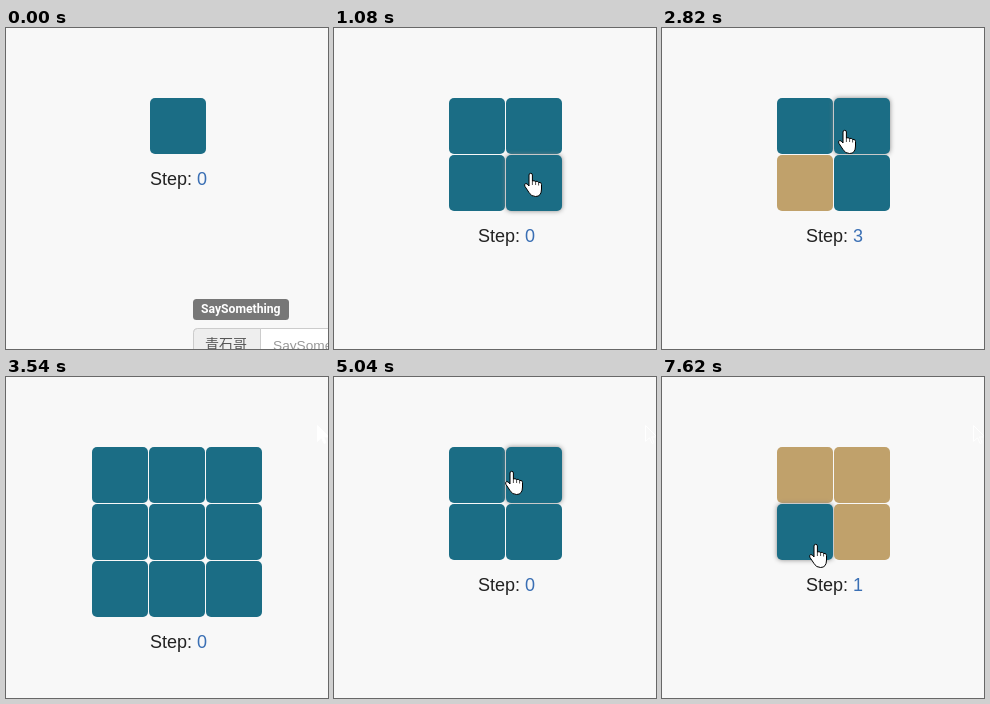
These frames come from a looping animation (322 px wide and 321 px high, 8 s). An HTML page:

```html
<!DOCTYPE html>
<html lang="en">
<head>
<meta charset="utf-8">
<title>Tile flip</title>
<style>
  html, body { margin: 0; width: 100%; height: 100%; overflow: hidden; background: #f8f8f8; }
  svg { display: block; }
  text { font-family: "Liberation Sans", Arial, sans-serif; }
  .step { font-size: 18px; fill: #222; }
  .step tspan { fill: #3a6fb4; }
  .label { font: 700 12.2px Roboto, sans-serif; fill: #fff; }
  .name { font: 14px "Noto Sans CJK SC", "Noto Sans CJK", sans-serif; fill: #555; }
  .hint { font-size: 13.7px; fill: #999; }
  .hover { filter: drop-shadow(0 0 2.5px #888); }
  .cursor path { fill: #fff; stroke: #000; stroke-linejoin: round; }
</style>
</head>
<body>
<svg width="322" height="321" viewBox="0 0 322 321">
  <g id="tiles"></g>
  <g id="below">
    <text class="step" x="144" y="157" xml:space="preserve">Step: <tspan id="count">0</tspan></text>
    <rect x="187" y="271" width="96" height="21" rx="3.5" fill="#777"/>
    <text class="label" x="195" y="285">SaySomething</text>
    <rect x="187.5" y="300.5" width="160" height="33" rx="4" fill="#fff" stroke="#ccc"/>
    <path d="M254.5 300.5H191.5a4 4 0 0 0-4 4V333.5H254.5Z" fill="#eee" stroke="#ccc"/>
    <text class="name" x="199" y="321">青石哥</text>
    <text class="hint" x="267" y="322">SaySomething</text>
  </g>
  <path id="trace" transform="translate(311 48)" stroke="#fff"
    d="M.5 .5V16.5L4.5 12.8L7 18.5L9 17.6L6.6 12H12Z"/>
  <g class="cursor" id="cursor">
    <path id="arrow" d="M.5 .5V16.5L4.3 12.9L6.8 18.6L9.2 17.6L6.8 12H12Z"/>
    <g id="hand" transform="translate(-6 -1)">
      <path d="M5 13V2a1.7 1.7 0 0 1 3.4 0V8q1.7-.9 3.2.5q1.7-.8 3 .9q2.9-.6 2.9 2V16q0 7.5-6 7.5q-4.5 0-6.5-4L1 13.5q-1-2 .3-2.8q1.7-.9 3.7 2.3Z"/>
      <path d="M8.4 8V12M11.6 8.5V12M14.6 9.5V12.5" style="fill:none;stroke-width:.7"/>
    </g>
  </g>
</svg>
<script>
const LOOP = 8000, TICK = 60, SIZE = 56, PITCH = 57;
const TEAL = '#1b6d85', GOLD = '#c0a16b';
const ENTER = 120, LEAVE = 3480, RELOAD = 3840;
const $ = id => document.getElementById(id);

const clicks = [600, 1260, 1920, 2460, 3180, 5040, 6780];

// pointer moves: start, duration, x, y
const moves = [
  [ENTER, 240, 160, 102],
  [600, 480, 196, 146],
  [1260, 540, 133, 101],
  [1980, 300, 137, 148],
  [2460, 480, 190, 95],
  [3180, 300, 311, 48],
  [RELOAD, 480, 177, 98],
  [4440, 180, 177, 95],
  [5400, 420, 195, 107],
  [7020, 600, 153, 168]];

const tiles = Array.from({ length: 9 }, () => {
  const r = document.createElementNS('http://www.w3.org/2000/svg', 'rect');
  r.setAttribute('width', SIZE);
  r.setAttribute('height', SIZE);
  r.setAttribute('rx', 5);
  return $('tiles').appendChild(r);
});

const ease = u => u * u * (3 - 2 * u);
const clamp = u => Math.max(0, Math.min(1, u));

function pointerAt(t) {
  let x = 260, y = 66;
  for (const [start, span, tx, ty] of moves) {
    const e = ease(clamp((t - start) / span));
    x += (tx - x) * e;
    y += (ty - y) * e;
  }
  return [Math.round(x), Math.round(y)];
}

const newGame = n => ({ n, step: 0, flipped: Array(n * n).fill(false) });
const cell = (n, i) => [144 - 29 * (n - 1) + i % n * PITCH, 70 + Math.floor(i / n) * PITCH];
const inside = (p, c) => p.every((v, k) => v >= c[k] && v < c[k] + SIZE);

function tileUnder({ n, flipped }, point) {
  return flipped.findIndex((f, i) => !f && inside(point, cell(n, i)));
}

// flip a tile and its neighbours; a full board opens the next size
function press(game, tile) {
  const { n, step, flipped } = game;
  if (tile < 0) return game;
  const [x, y] = cell(n, tile);
  const next = flipped.map((f, i) => {
    const [cx, cy] = cell(n, i);
    return Math.abs(cx - x) + Math.abs(cy - y) <= PITCH ? !f : f;
  });
  return next.every(Boolean) ? newGame(n + 1) : { n, step: step + 1, flipped: next };
}

function gameAt(t) {
  const from = t < RELOAD ? 0 : RELOAD;
  return clicks.filter(c => c >= from && c <= t)
    .reduce((g, c) => press(g, tileUnder(g, pointerAt(c))), newGame(1));
}

const show = (el, on) => el.setAttribute('visibility', on ? 'visible' : 'hidden');

function render(t) {
  const game = gameAt(t), { n, step, flipped } = game;
  const tip = pointerAt(t);
  const present = t >= ENTER && (t <= LEAVE || t >= RELOAD);
  const over = present ? tileUnder(game, tip) : -1;

  tiles.forEach((r, i) => {
    const [x, y] = cell(n, i);
    show(r, i < n * n);
    r.setAttribute('x', x);
    r.setAttribute('y', y);
    r.setAttribute('fill', flipped[i] ? GOLD : TEAL);
    r.setAttribute('class', i === over ? 'hover' : '');
  });

  $('below').setAttribute('transform', `translate(0 ${PITCH * (n - 1)})`);
  $('count').textContent = step;

  show($('arrow'), present && over < 0);
  show($('hand'), over >= 0);
  $('cursor').setAttribute('transform', `translate(${tip})`);

  show($('trace'), t > LEAVE);
  $('trace').setAttribute('fill', t < RELOAD ? '#fff' : 'none');
}

function loop() {
  const t = performance.now() % LOOP;
  render(Math.floor(t / TICK) * TICK);
  requestAnimationFrame(loop);
}
loop();
</script>
</body>
</html>
```
